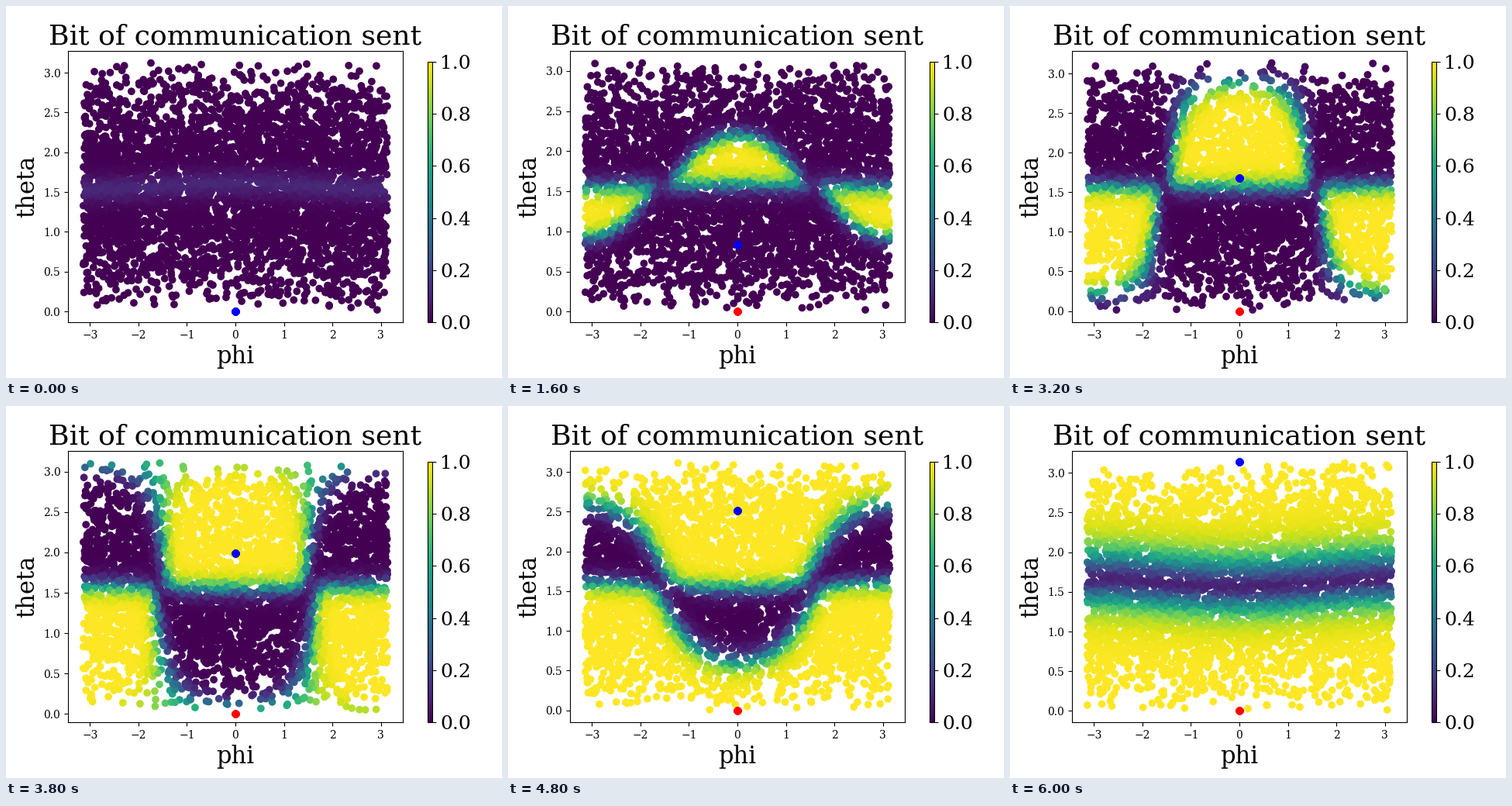
These frames come from a looping animation (640x480 px, 6200 ms). A matplotlib script:

```python
import numpy as np
import matplotlib.pyplot as plt
from matplotlib.animation import FuncAnimation

STEPS = 31
COUNT = 4000
COPIES = 60
SHARP = 17

plt.rcParams["font.family"] = "DejaVu Serif"


def sigmoid(x):
    return 1 / (1 + np.exp(-SHARP * x))


def sample(step):
    """Points spread evenly over the sphere as phi, theta."""
    rng = np.random.default_rng(100 + step)
    phi = rng.uniform(-np.pi, np.pi, COUNT)
    theta = np.arccos(rng.uniform(-1, 1, COUNT))
    return phi, theta


def along(angle, phi, theta):
    """Component of each point along the direction (phi=0, theta=angle)."""
    return (np.sin(angle) * np.sin(theta) * np.cos(phi)
            + np.cos(angle) * np.cos(theta))


def bit(phi, theta, turn):
    """Chance that the bit is 1: the two half-space tests disagree."""
    tilt = 0.04 - 0.09 * turn
    u = along(tilt, phi, theta)
    v = along(np.pi * turn + tilt, phi, theta) - 0.03 * turn
    gap = 0.12 + (0.12 + 0.14 * turn + 0.26 * turn**12) * np.abs(u)
    above = sigmoid(u)
    return above * sigmoid(-v - gap) + (1 - above) * sigmoid(v - gap)


def marker(angle, color):
    # Stacked copies give the marker a hard edge.
    return ax.scatter(np.zeros(COPIES), np.full(COPIES, angle), color=color)


fig, ax = plt.subplots(figsize=(6.4, 4.8), dpi=100)
fig.subplots_adjust(left=0.125, right=0.8, bottom=0.15, top=0.88)
ax.set_title("Bit of communication sent", fontsize=26)
ax.set_xlabel("phi", fontsize=22)
ax.set_ylabel("theta", fontsize=22)
ax.set_xlim(-1.1 * np.pi, 1.1 * np.pi)

cloud = ax.scatter([0], [0], c=[0], cmap="viridis", vmin=0, vmax=1)
bar = fig.colorbar(cloud, cax=fig.add_axes([0.85, 0.15, 0.01, 0.7]))
bar.ax.tick_params(labelsize=18)

fixed = marker(0, "red")
moving = marker(0, "blue")


def update(step):
    turn = step / (STEPS - 1)
    phi, theta = sample(step)
    cloud.set_offsets(np.column_stack([phi, theta]))
    cloud.set_array(bit(phi, theta, turn))
    moving.set_offsets(np.tile([0, np.pi * turn], (COPIES, 1)))

    pad = 0.05 * np.ptp(theta)
    ax.set_ylim(theta.min() - pad, theta.max() + pad)
    return cloud, fixed, moving


anim = FuncAnimation(fig, update, frames=STEPS, interval=200,
                     repeat=True, repeat_delay=0, blit=False)
plt.show()
```
